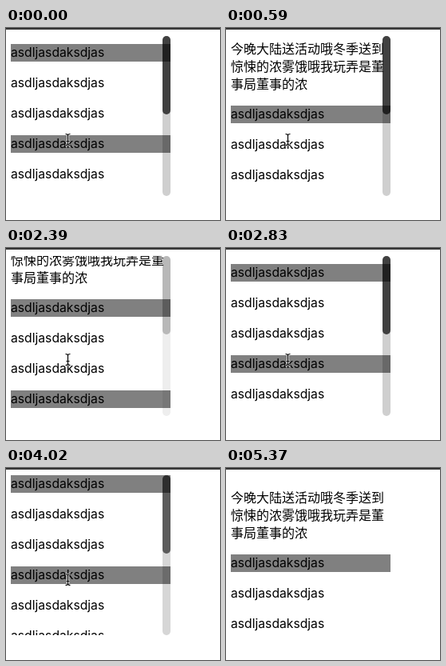
Animation of 268x240 px, one loop 5.96 s. Source, as an HTML page:

```html
<!DOCTYPE html>
<html lang="zh">
<head>
<meta charset="utf-8">
<title>Scrolling list</title>
<style>
  html, body { margin: 0; width: 100%; height: 100%; overflow: hidden; background: #fff; }
  #edge { position: absolute; left: 0; top: 0; width: 268px; height: 2px; background: #363636; }
  #box { position: absolute; left: 6px; top: 10px; width: 200px; height: 200px; overflow: hidden; }
  #list { position: absolute; left: 0; top: 0; width: 200px; font: 15.7px/22px Inter, sans-serif; color: #000; }
  p { margin: 16px 0; height: 22px; }
  #intro { position: relative; top: -1px; height: 66px; font: 16px/22px "Noto Sans CJK SC", "Noto Sans CJK", sans-serif; word-break: break-all; }
  p:nth-child(3n + 2) { background: #808080; }
  #bar, #thumb { position: absolute; right: 0; top: 0; width: 10px; border-radius: 5px; }
  #bar { height: 200px; background: rgba(0, 0, 0, .19); }
  #thumb { height: 98px; background: rgba(0, 0, 0, .69); }
  svg { position: absolute; left: 0; top: 0; overflow: visible; }
</style>
</head>
<body>
<div id="box">
  <div id="list"><p id="intro">今晚大陆送活动哦冬季送到惊悚的浓雾饿哦我玩弄是董事局董事的浓</p></div>
  <div id="bar"><div id="thumb"></div></div>
</div>
<div id="edge"></div>
<svg id="beam" width="1" height="1" fill="none">
  <defs><path id="stem" d="M-3-7Q0-7 0-5Q0-7 3-7M0-5V5M-3 7Q0 7 0 5Q0 7 3 7M-2 2H2"/></defs>
  <use href="#stem" stroke="#fff" stroke-width="2.6"/>
  <use href="#stem" stroke="#000" stroke-width="1.2"/>
</svg>
<svg id="arrow" width="1" height="1">
  <path transform="scale(.85)" d="M0 0V14.5L3.3 11.4L5.6 16.7L8 15.7L5.7 10.5H10.6Z" fill="#000" stroke="#fff" stroke-width="1.8" paint-order="stroke"/>
</svg>
<script>
const $ = id => document.getElementById(id);
const LOOP = 5960, TICK = 149;
const END = 202, FADE = 120, LINGER = 940;

for (let i = 0; i < 8; i++) {
  const row = document.createElement('p');
  row.textContent = 'asdljasdaksdjas';
  $('list').append(row);
}

// Swipes over the list; the first one ends before the loop begins.
const swipes = [
  { start: -600, end: -100, to: END },
  { start: 140, end: 596, to: 11 },
  { start: 2340, end: 2830, to: END },
  { start: 3920, end: 4260, to: 0 }
];
const PULL = 3570, RELEASE = 3740;
const LEAVE = 4762, GONE = 5200;

const clamp = v => Math.min(1, Math.max(0, v));
const easeOut = (t, start, end, power) => 1 - (1 - clamp((t - start) / (end - start))) ** power;
const move = (el, x, y) => el.style.transform = `translate(${x}px, ${y}px)`;

const scrollAt = t => swipes.reduce((y, s) => y + (s.to - y) * easeOut(t, s.start, s.end, 2), 0);

// The bar fades in with each swipe and lingers after it.
const barAt = t => Math.max(...swipes.map(s =>
  clamp((t - s.start) / FADE) * clamp((s.end + LINGER + FADE - t) / FADE)));

// Pulling past the end lifts the page, which then springs back.
const shiftAt = t => t < PULL ? 0 : -7 * Math.exp(-Math.max(0, t - RELEASE) / 130);

function draw() {
  // The picture advances in even ticks, like a screen recording.
  const t = Math.floor((performance.now() % LOOP + 8) / TICK) * TICK;

  move($('box'), 0, Math.round(shiftAt(t)));
  move($('list'), 0, -Math.round(scrollAt(t)));
  $('bar').style.opacity = barAt(t);

  const isBeam = t < swipes[3].end;
  const away = easeOut(t, LEAVE, GONE, 3);
  $('beam').style.display = isBeam ? 'block' : 'none';
  $('arrow').style.display = isBeam || t > GONE ? 'none' : 'block';
  move($('beam'), 77.5, 139.5);
  move($('arrow'), 77 + 184 * away, 139 + 102 * away);

  requestAnimationFrame(draw);
}
draw();
</script>
</body>
</html>
```
